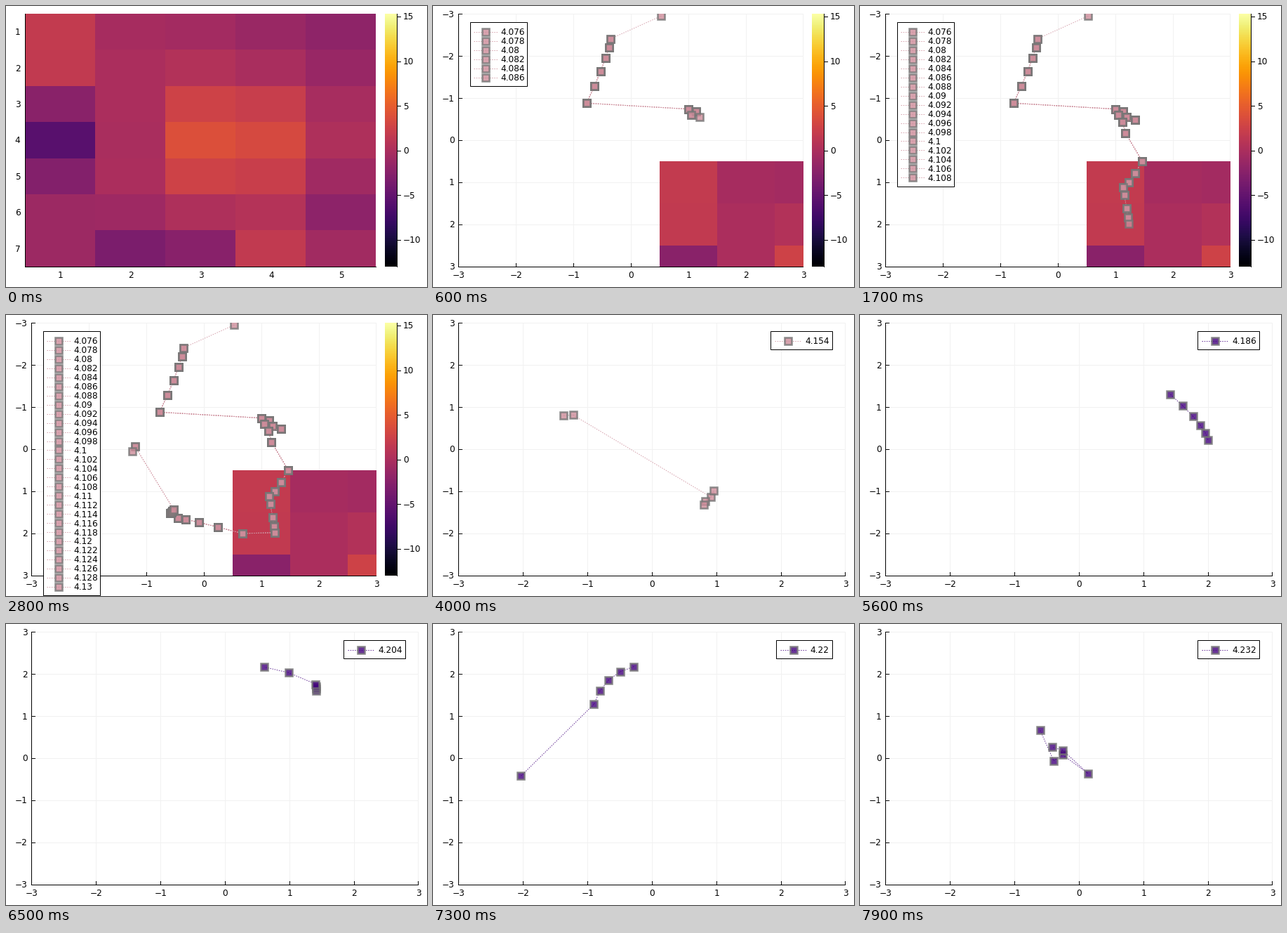
A matplotlib script that plays this animation: 600 px wide and 400 px high, repeating every 8000 ms.

```python
import numpy as np
import matplotlib.pyplot as plt
from matplotlib.animation import FuncAnimation
from matplotlib.patches import Rectangle

FRAMES, STEP_MS = 80, 100
TRAIL = 6                # points shown per time step
LAST_OVERLAY = 32        # trails pile up on the heatmap until here
RECOLOR = 48             # trail turns from pink to indigo
TOP, BOTTOM = 11.8, 371.5
VMIN, VMAX = -13.0, 15.3
PX = 0.72                # points per pixel at 100 dpi
SHIFT = 0.6              # aligns strokes with the pixel grid
PINK = (0.805, 0.55, 0.605)
INDIGO = (0.26, 0.0, 0.49)
GRAY = (0.46, 0.46, 0.46)


def bump(col, row, height, width=0.75):
    r, c = np.mgrid[1:8, 1:6]
    return height * np.exp(-(2 * (c - col) ** 2 + (r - row) ** 2)
                           / (2 * width ** 2))


HEAT = (-0.9 + bump(3.4, 4, 5.2, 1.3) + bump(1, 1.5, 3.3) + bump(1, 4, -5)
        + bump(2.45, 7.5, -4.5) + bump(4.2, 7.5, 3.2) + bump(5.3, 6, -2)
        + bump(4.8, 1.2, -1.2, 1))


def run(n, *keys):
    """n samples of the Bezier curve with the given control points."""
    t = np.linspace(0, 1, n)[:, None]
    pts = [np.array(k) + 0 * t for k in keys]
    while len(pts) > 1:
        pts = [a + (b - a) * t for a, b in zip(pts, pts[1:])]
    return pts[0]


# The peak drifts along smooth runs and now and then jumps.
PATH = np.vstack([
    run(1, (0.53, -2.95)),
    run(6, (-0.35, -2.41), (-0.4, -1.95), (-0.77, -0.88)),
    run(2, (1.0, -0.74), (1.14, -0.68)),
    run(3, (1.05, -0.6), (1.35, -0.49)),
    run(2, (1.13, -0.43), (1.18, -0.17)),
    run(4, (1.47, 0.5), (1.27, 0.99), (1.14, 1.12)),
    run(4, (1.16, 1.3), (1.22, 1.83), (1.24, 1.98)),
    run(5, (0.67, 2.0), (-0.28, 1.66), (-0.45, 1.63)),
    run(4, (-0.59, 1.52), (-0.52, 1.44)),
    run(1, (-1.2, -0.07)),
    run(7, (-1.24, 0.05), (-1.46, 0.4), (-1.38, 0.72)),
    run(2, (-1.37, 0.8), (-1.22, 0.81)),
    run(1, (0.92, -1.14)),
    run(2, (0.96, -0.99), (0.83, -1.23)),
    run(10, (0.81, -1.32), (0.3, -6.2), (1.99, 0.05)),
    run(7, (2.0, 0.1), (2.07, 0.42), (1.415, 1.31)),
    run(1, (-2.01, 0.03)),
    run(6, (1.42, 1.5), (1.41, 1.76)),
    run(9, (0.99, 2.03), (-0.6, 2.7), (-0.9, 1.28)),
    run(1, (-2.03, -0.42)),
    run(1, (-0.6, 0.66)),
    run(2, (-0.39, -0.06), (-0.25, 0.08)),
    run(1, (0.14, -0.36)),
    run(2, (-0.25, 0.19), (-0.41, 0.26)),
])

fig = plt.figure(figsize=(6, 4), dpi=100, facecolor="white")
ax = fig.add_axes([0, 0, 1, 1])


def line(xs, ys, color="black", width=1.0, z=2, **kw):
    return ax.plot(xs, ys, color=color, lw=width * PX, zorder=z, **kw)


def label(x, y, s, ha="center", z=4):
    ax.text(x + SHIFT, y + 4.4, s, ha=ha, va="baseline", fontsize=8.7,
            family="DejaVu Sans", zorder=z)


def num(v):
    return str(v).replace("-", "\u2212")


def plot_area(left, right):
    return Rectangle((left, TOP), right - left, BOTTOM - TOP,
                     transform=ax.transData)


def dotted(xs, ys, color, z):
    """Each segment restarts its dots, so repeated trails coincide."""
    return line(np.array([xs[:-1], xs[1:]]), np.array([ys[:-1], ys[1:]]),
                color, 1.0, z, alpha=0.8, linestyle=(0, (1.5, 1.7)))


def squares(xs, ys, color, z):
    return ax.plot(xs, ys, "s", ms=9.9 * PX, mew=2.6 * PX, zorder=z,
                   mfc=color + (0.8,), mec=GRAY + (0.8,))


def heatmap(left, top, right, bottom, clip):
    img = ax.imshow(HEAT, cmap="inferno", vmin=VMIN, vmax=VMAX, zorder=3,
                    extent=(left, right, bottom, top), aspect="auto",
                    interpolation="nearest")
    img.set_clip_path(clip)


def colorbar():
    ax.imshow(np.linspace(1, 0, 256)[:, None], cmap="inferno", zorder=2,
              extent=(540.6, 558.6, BOTTOM, TOP), aspect="auto")
    line([558, 558], [TOP, BOTTOM])
    for v in range(-10, 16, 5):
        y = TOP + (VMAX - v) / (VMAX - VMIN) * (BOTTOM - TOP)
        line([558, 563], [y, y])
        label(566, y, num(v), "left")


def legend(left, labels, color, wide):
    """Boxed key with one row per label."""
    pitch = 12.96
    start, end, text, pad = (6, 43, 48, 6.5) if wide else (5, 39, 42.5, 5.5)
    width = text + pad + max(33.5 - 7.7 * (5 - len(s)) for s in labels)
    if wide:
        left = 570 - width
    ax.add_patch(Rectangle((left, 24), width, pitch * (len(labels) + 1),
                           fc="white", ec="black", lw=PX, zorder=8))
    for i, s in enumerate(labels):
        y = 24 + SHIFT + pitch * (i + 1)
        dotted([left + start, left + end], [y, y], color, 9)
        squares([left + (start + end) / 2], [y], color, 9)
        label(left + text, y, s, "left", 10)


def stamp(n):
    return f"{4.074 + 0.002 * n:.3f}".rstrip("0")


def frame_axes(left, right):
    line([left, left], [TOP, BOTTOM], z=4)
    line([left, right], [BOTTOM, BOTTOM], z=4)


def plain_heatmap():
    left, right = 28, 528
    heatmap(left, TOP, right, BOTTOM, plot_area(left, right))
    frame_axes(left, right)
    for i in range(5):
        label(left + 100 * (i + 0.5), 383.5, str(i + 1))
    for i in range(7):
        label(20.5, TOP + (BOTTOM - TOP) * (i + 0.5) / 7, str(i + 1), "right")
    colorbar()


def path_plot(n):
    overlay = n <= LAST_OVERLAY
    left, right = 37, 528 if overlay else 588
    flip = 1 if overlay else -1
    clip = plot_area(left, right)

    def X(v):
        return left + (v + 3) / 6 * (right - left)

    def Y(v):
        return TOP + (flip * v + 3) / 6 * (BOTTOM - TOP)

    for v in range(-3, 4):
        line([X(v), X(v)], [TOP, BOTTOM], "0.945", z=1)
        line([left, right], [Y(v), Y(v)], "0.945", z=1)
        line([X(v), X(v)], [BOTTOM, BOTTOM - 5])
        line([left, left + 5], [Y(v), Y(v)])
        label(X(v), 383.5, num(v))
        label(30.5, Y(v), num(v), "right")
    frame_axes(left, right)

    if overlay:
        heatmap(X(0.5), Y(0.5), X(5.5), Y(7.5), clip)
        colorbar()
    color = PINK if n < RECOLOR else INDIGO
    steps = range(1 if overlay else n, n + 1)
    for k in steps:
        x, y = PATH[k - 1:k - 1 + TRAIL].T
        for art in dotted(X(x), Y(y), color, 5) + squares(X(x), Y(y), color, 5):
            art.set_clip_path(clip)
    legend(53.5, [stamp(k) for k in steps], color, not overlay)


def draw(n):
    ax.clear()
    ax.set_axis_off()
    if n == 0:
        plain_heatmap()
    else:
        path_plot(n)
    ax.set_xlim(SHIFT, 600 + SHIFT)
    ax.set_ylim(400 + SHIFT, SHIFT)
    return []


anim = FuncAnimation(fig, draw, frames=FRAMES, init_func=lambda: [],
                     interval=STEP_MS, repeat=True, repeat_delay=0, blit=False)
plt.show()
```
